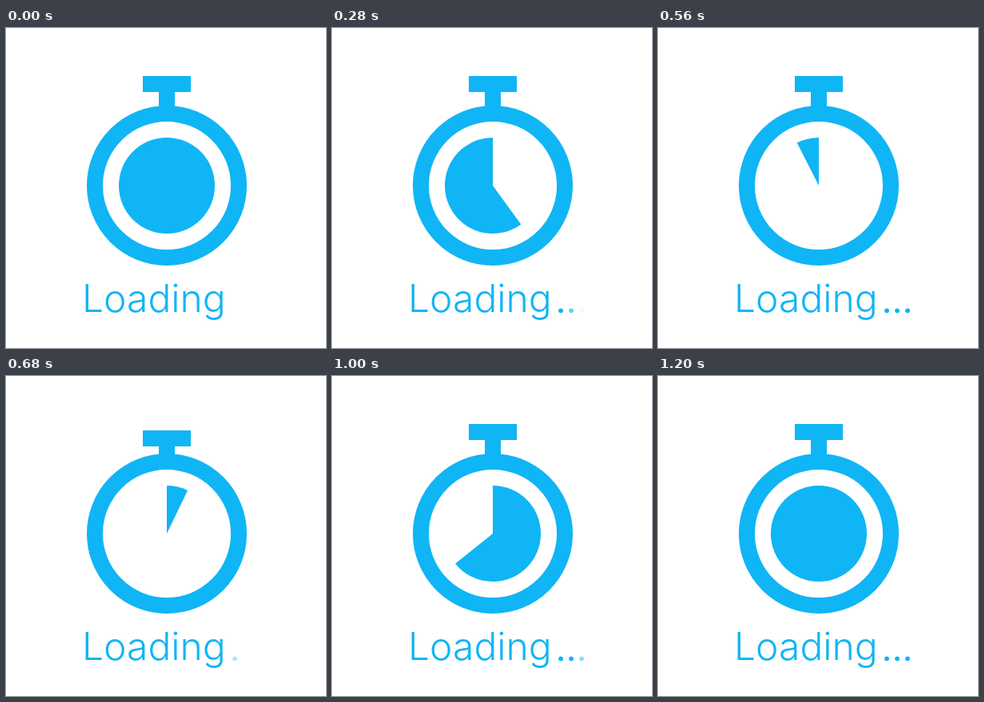
An HTML page with a canvas for the animation above (1.24 s loop, 400x400 px).

```html
<!DOCTYPE html>
<html lang="en">
<head>
<meta charset="utf-8">
<title>Loading stopwatch</title>
<style>
  html, body { margin: 0; width: 100%; height: 100%; overflow: hidden; background: #fff; }
  canvas { display: block; }
</style>
</head>
<body>
<canvas id="stage" width="400" height="400"></canvas>
<script>
const ctx = document.getElementById('stage').getContext('2d');
const COLOR = '#10b5f5';
const STEP = 40, LOOP = 1240, HALF = 15;
const CX = 201, CY = 197;
const TAU = Math.PI * 2;

// Linear progress of x from start over a length, limited to 0..1
const ramp = (x, start, length) => Math.min(1, Math.max(0, (x - start) / length));

function disc(x, y, r) {
  ctx.beginPath();
  ctx.arc(x, y, r, 0, TAU);
  ctx.fill();
}

function drawWatch(press) {
  ctx.fillRect(171, 60 + press, 60, 20);
  ctx.fillRect(191, 78 + press, 20, 24 - press);
  ctx.lineWidth = 20;
  ctx.beginPath();
  ctx.arc(CX, CY, 90, 0, TAU);
  ctx.stroke();
}

// Sector between two fractions of a clockwise turn from twelve o'clock
function drawSector(from, to) {
  if (to <= from) return;
  if (to - from >= 1) return disc(CX, CY, 60);
  ctx.beginPath();
  ctx.moveTo(CX, CY);
  ctx.arc(CX, CY, 60, from * TAU - TAU / 4, to * TAU - TAU / 4);
  ctx.fill();
}

function drawLabel(dotAlpha) {
  ctx.font = '300 48px Inter, "Open Sans", sans-serif';
  ctx.fillText('Loading', 95, 355);
  for (let i = 0; i < 3; i++) {
    ctx.globalAlpha = dotAlpha(i);
    disc(286 + i * 13, 353.3, 2.9);
  }
  ctx.globalAlpha = 1;
}

function draw(now) {
  const tick = Math.floor((now % LOOP) / STEP);
  const emptying = tick < HALF;
  const beat = emptying ? tick : tick - HALF;
  const press = beat < 4 ? 8 * Math.sin(beat * Math.PI / 4) : 0;

  ctx.fillStyle = '#fff';
  ctx.fillRect(0, 0, 400, 400);
  ctx.fillStyle = ctx.strokeStyle = COLOR;

  drawWatch(press);
  if (emptying) {
    drawSector(ramp(tick, 5 / 3, 40 / 3), 1);
    drawLabel(i => ramp(tick, 1.67 + i * 2.5, 4.3));
  } else {
    drawSector(0, ramp(tick, 16, 14));
    drawLabel(i => ramp(tick, 16 + i * 3.8, 3));
  }
}

const start = performance.now();
function loop() {
  draw(performance.now() - start);
  requestAnimationFrame(loop);
}
loop();
</script>
</body>
</html>
```
